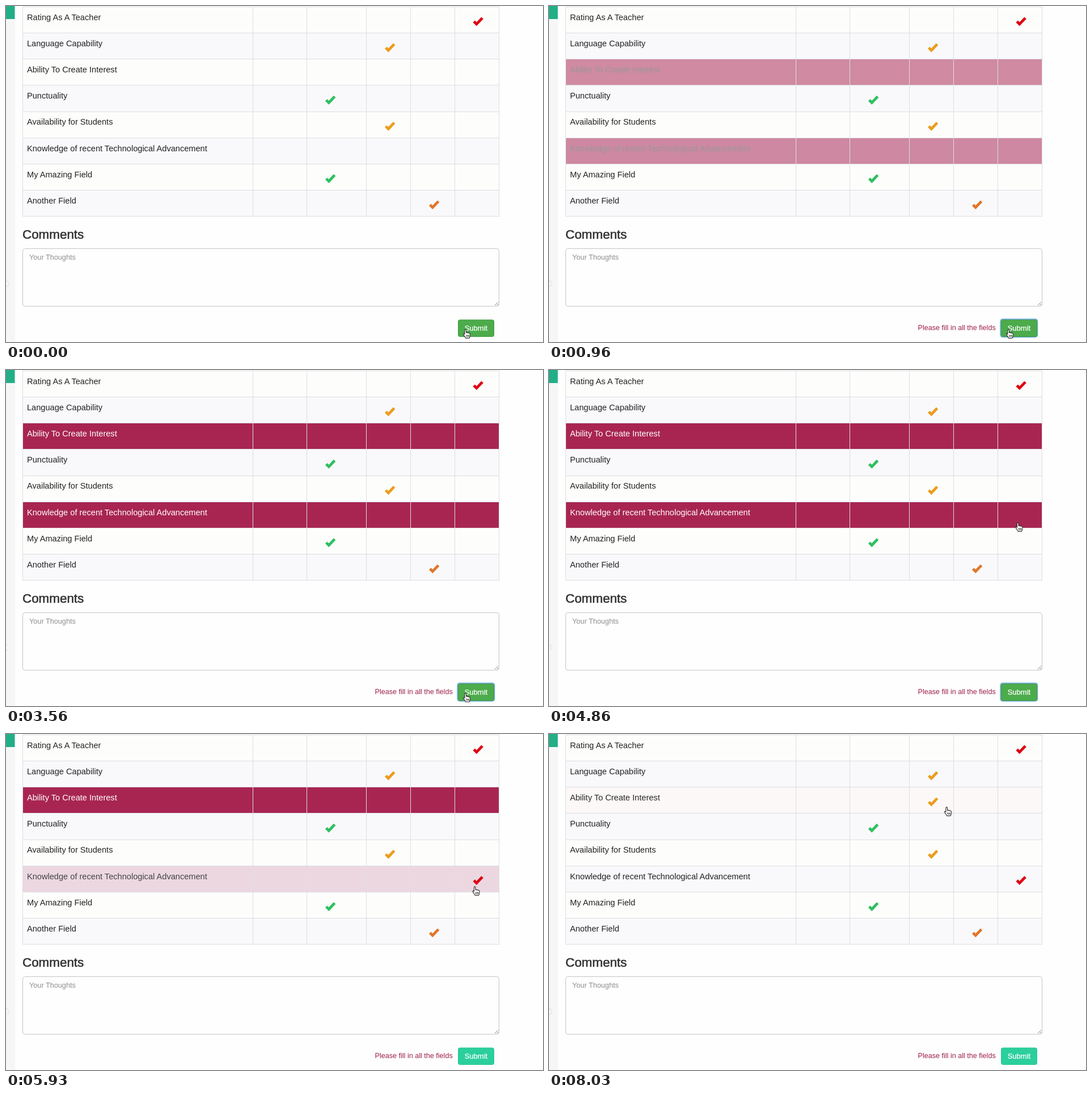
An HTML page that plays this animation: 947x592 px, repeating every 8.06 s.

```html
<!DOCTYPE html>
<html lang="en">
<head>
<meta charset="utf-8">
<title>Feedback form</title>
<style>
html, body { margin: 0; width: 100%; height: 100%; overflow: hidden; background: #fdfefd; }
svg { display: block; width: 947px; height: 592px; }
text { font-family: "Liberation Sans", Arial, sans-serif; }
</style>
</head>
<body>
<svg id="stage" viewBox="0 0 947 592"></svg>
<script>
(() => {
const LOOP = 8060, FADE = 1000;
const FOCUS = 560, SUBMIT = 650, BLUR = 5290, PICK_A = 5390, PICK_B = 7240;
const stage = document.getElementById('stage');

function add(tag, attrs, str) {
  const el = document.createElementNS('http://www.w3.org/2000/svg', tag);
  set(el, attrs);
  if (str) el.textContent = str;
  return stage.appendChild(el);
}
function set(el, attrs) {
  for (const k in attrs) el.setAttribute(k, attrs[k]);
}
const box = (x, y, width, height, fill, more) => add('rect', { x, y, width, height, fill, ...more });
const line = (d, stroke, more) => add('path', { d, stroke, fill: 'none', ...more });
const label = (x, y, size, fill, str, more) => add('text', { x, y, 'font-size': size, fill, ...more }, str);

const clamp = v => Math.max(0, Math.min(1, v));
const mix = (a, b, k) => `rgb(${a.map((v, i) => Math.round(v + (b[i] - v) * k))})`;
const smooth = k => k * k * (3 - 2 * k);

// Standard CSS "ease" curve
function ease(x) {
  if (x <= 0 || x >= 1) return clamp(x);
  let lo = 0, hi = 1;
  for (let i = 0; i < 20; i++) {
    const s = (lo + hi) / 2, r = 1 - s;
    if (.75 * r * s + s * s * s < x) lo = s; else hi = s;
  }
  const r = 1 - lo;
  return .3 * r * r * lo + 3 * r * lo * lo + lo * lo * lo;
}

// Sidebar
box(0, 0, 16, 592, '#f6f6f6');
box(0, 0, 15.5, 23, '#22ae87');
const spinner = line('M-4.3 -2.5A5 5 0 1 1 -2.5 4.3', '#e6e6e6', { 'stroke-width': 1.4 });

// Table
const ROWS = ['Rating As A Teacher', 'Language Capability', 'Ability To Create Interest', 'Punctuality',
  'Availability for Students', 'Knowledge of recent Technological Advancement', 'My Amazing Field', 'Another Field'];
const EDGES = [29.5, 435.5, 530.5, 635.5, 713.5, 791.5, 869.5];
const PLAIN = [[253, 254, 252], [249, 249, 252]];
const DARK = [34, 34, 34], WHITE = [255, 255, 255], WINE = [168, 37, 82];
const GREEN = '#2fbf60', AMBER = '#ec9c1c', RUST = '#e2752a', RED = '#e00010';
const rowTop = i => Math.round(1 + 46.14 * i) + .5;

const rows = ROWS.map((name, i) => ({
  base: PLAIN[i % 2],
  bg: box(29.5, rowTop(i), 840, rowTop(i + 1) - rowTop(i), mix(PLAIN[i % 2], WINE, 0))
}));
line(ROWS.concat('').map((_, i) => `M29 ${rowTop(i)}H870`).join('') +
  EDGES.map(x => `M${x} 1V371`).join(''), '#dddde0');
rows.forEach((row, i) => {
  row.text = label(37, 24.8 + 46.14 * i, 14.6, mix(DARK, WHITE, 0), ROWS[i]);
});

const tick = (x, row, color) => line('M-7.3 .6L-2.7 5.2L7.6 -5.6', color,
  { 'stroke-width': 4.8, transform: `translate(${x} ${26.7 + 46.14 * row})` });
tick(832.5, 0, RED);
tick(677, 1, AMBER);
tick(572, 3, GREEN);
tick(677, 4, AMBER);
tick(572, 6, GREEN);
tick(755, 7, RUST);
const tickA = tick(832.5, 5, RED);
const tickB = tick(677, 2, AMBER);

// Comment form
label(29, 409.5, 22.4, '#333', 'Comments', { stroke: '#333', 'stroke-width': .6 });
box(29.5, 427.5, 840, 101.5, '#fdfefd', { rx: 4, stroke: '#c4c4c4' });
label(41, 446.5, 12.7, '#8e8e8e', 'Your Thoughts');
line('M862 527.5L868 521.5M866 527.5L868.5 525', '#777');

const error = label(650.5, 570.5, 12.6, '#a02050', 'Please fill in all the fields');
const ring = box(796, 551.5, 65.5, 32, '#8fc1ee', { rx: 4, stroke: '#73ade4', 'stroke-width': 1.5 });
const button = box(797.5, 553, 63, 29.5, '#4cab4b', { rx: 3 });
label(808.7, 572.3, 13, '#fff', 'Submit', { stroke: '#fff', 'stroke-width': .25 });

const hand = line('M-3.6 -6Q-3.6 -7.6 -2.3 -7.6Q-1 -7.6 -1 -6V-2Q.6 -3 1.4 -1.6Q3 -2.4 3.8 -1' +
  'Q5.8 -1.6 5.9 .6V3Q5.9 4.6 4.6 7.6H-2Q-3 5 -5.6 1.8Q-6.6 -.2 -4.8 -.2Q-4.2 0 -3.6 1Z' +
  'M-.6 2V5.2M1.5 2V5.2M3.5 2V5.2', '#2a2a2a',
  { fill: '#fff', 'stroke-width': 1.1, 'stroke-linejoin': 'round' });

// Pointer stops: time, x, y
const STOPS = [[0, 812.5, 577.5], [3540, 812.5, 577.5], [4700, 829, 276.5],
  [6100, 829, 276.5], [6950, 703.5, 136.5], [LOOP, 703.5, 136.5]];

function pointer(t) {
  const i = STOPS.findIndex(s => s[0] > t);
  const [t0, x0, y0] = STOPS[i - 1], [t1, x1, y1] = STOPS[i];
  const k = smooth((t - t0) / (t1 - t0));
  return `translate(${x0 + (x1 - x0) * k} ${y0 + (y1 - y0) * k})`;
}

function paintRow(row, t, fixed) {
  const k = ease((t - SUBMIT) / FADE) * (1 - ease((t - fixed) / FADE));
  row.bg.setAttribute('fill', mix(row.base, WINE, k));
  row.text.setAttribute('fill', mix(DARK, WHITE, k));
}
const show = (el, on) => el.setAttribute('visibility', on ? 'visible' : 'hidden');

function draw(t) {
  paintRow(rows[2], t, PICK_B);
  paintRow(rows[5], t, PICK_A);
  show(tickA, t >= PICK_A);
  show(tickB, t >= PICK_B);
  show(error, t >= SUBMIT);
  show(ring, t >= FOCUS && t < BLUR);
  const k = ease((t - BLUR) / 300);
  set(button, {
    fill: mix([76, 171, 75], [43, 207, 156], k),
    stroke: mix([64, 154, 64], [43, 200, 150], k)
  });
  hand.setAttribute('transform', pointer(t));
  spinner.setAttribute('transform', `translate(0 489) rotate(${t / LOOP * 8 * 360})`);
}

const start = performance.now();
function frame() {
  draw((performance.now() - start) % LOOP);
  requestAnimationFrame(frame);
}
frame();
})();
</script>
</body>
</html>
```
